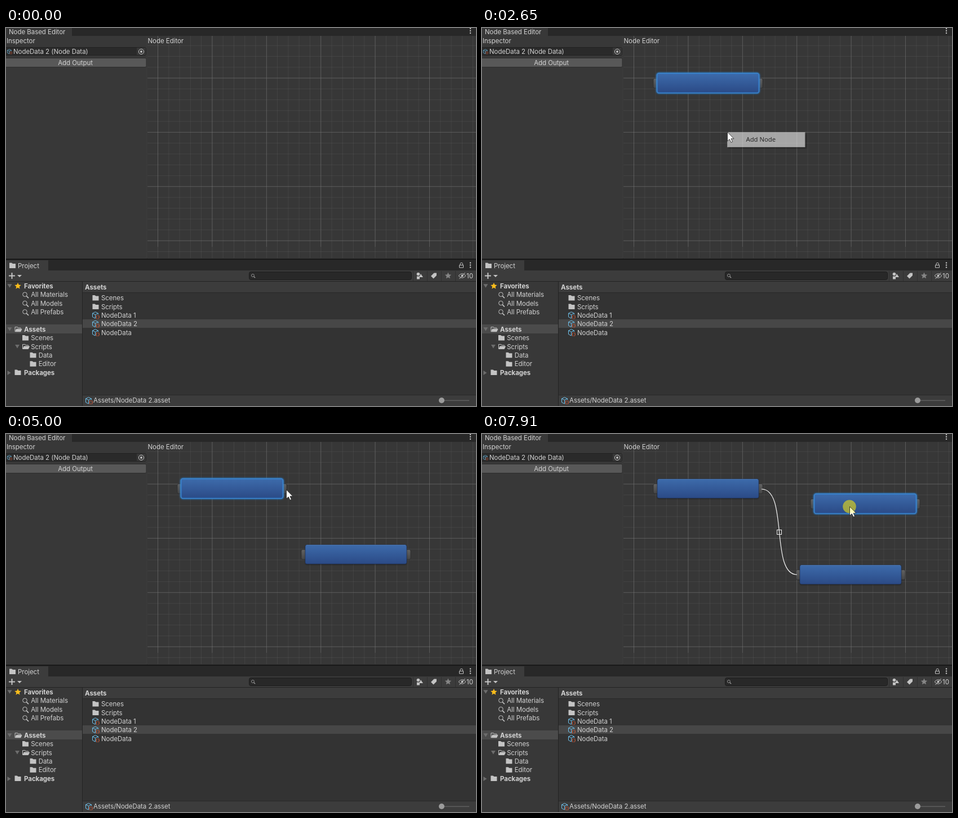
Animation, 834 px wide and 672 px high, one loop 7.99 s. Source, as an HTML page:

```html
<!DOCTYPE html>
<html lang="en">
<head>
<meta charset="utf-8">
<title>Node editor</title>
<style>
  html, body { margin: 0; width: 100%; height: 100%; overflow: hidden; background: #383838; }
  svg { display: block; }
  text { font: 11.5px Inter, Roboto, sans-serif; letter-spacing: -.05px; fill: #d2d2d2; white-space: pre; }
  .bold { font-weight: 700; }
  .menu { font: 11.3px "Open Sans", "Noto Sans", sans-serif; letter-spacing: 0; fill: #111; }
  .line { fill: none; stroke: #c4c4c4; }
</style>
</head>
<body>
<svg width="834" height="672" viewBox="0 0 834 672">
  <defs>
    <linearGradient id="body" x2="0" y2="1">
      <stop offset="0" stop-color="#3d6bab"/><stop offset="1" stop-color="#2b4a86"/>
    </linearGradient>
    <linearGradient id="pin" x2="0" y2="1">
      <stop offset="0" stop-color="#626262"/><stop offset="1" stop-color="#454545"/>
    </linearGradient>
    <linearGradient id="lit" x2="0" y2="1">
      <stop offset=".5" stop-color="#ffffb8"/><stop offset=".75" stop-color="#fff"/>
    </linearGradient>
    <filter id="blur" x="-10%" y="-40%" width="120%" height="180%"><feGaussianBlur stdDeviation="1.2"/></filter>
    <path id="folder" d="M0 0H4L6 1.5H11V9.5H0z" fill="#c4c4c4"/>
    <g id="open" class="line"><path d="M.5 9V1H5L6 2.5H10.500V4"/><path d="M1 9 3 4.500H12.500L10.500 9z" fill="#c4c4c4"/></g>
    <g id="lens" class="line"><circle cx="4.5" cy="4.5" r="3.8"/><path d="M7.300 7.300 11 11" stroke-width="1.6"/></g>
    <g id="asset" fill="none">
      <path d="M10.500 5V3L5.500 .5 .5 3V9.500L5.500 12V5.300L.5 3M5.500 5.300 10.500 3" stroke="#6fc0ea"/>
      <path d="M9 6.500Q7.500 6.500 7.700 8T6.700 9.600Q7.900 9.800 7.700 11.200T9 12.700M10.500 6.500Q12 6.500 11.800 8T12.800 9.600Q11.600 9.800 11.800 11.200T10.500 12.700" stroke="#e0603c"/>
    </g>
    <g id="dots" fill="#c4c4c4"><circle r="1.2" cy="-4"/><circle r="1.2"/><circle r="1.2" cy="4"/></g>
  </defs>
  <g id="ui"></g>
  <g id="stage"></g>
</svg>
<script>
const GREY = '#c4c4c4';
const rect = (x, y, w, h, fill, more = '') =>
  `<rect x="${x}" y="${y}" width="${w}" height="${h}" fill="${fill}" ${more}/>`;
// Text is placed by its vertical centre, on a whole-pixel baseline.
const text = (x, y, s, cls = '', more = '') =>
  `<text x="${x}" y="${Math.round(y + 4.2)}" class="${cls}" ${more}>${s}</text>`;
const use = (id, x, y, scale = 1) => `<use href="#${id}" transform="translate(${x} ${y}) scale(${scale})"/>`;
const shape = (d, fill, more = '') => `<path d="${d}" fill="${fill}" ${more}/>`;
const line = (d, more = '') => `<path class="line" d="${d}" ${more}/>`;
const dot = (x, y, r, fill, more = '') => `<circle cx="${x}" cy="${y}" r="${r}" fill="${fill}" ${more}/>`;

function star(x, y, fill) {
  const tip = i => {
    const a = i * Math.PI / 5, r = i % 2 ? 2.8 : 6;
    return `${x + r * Math.sin(a)} ${y - r * Math.cos(a)}`;
  };
  return shape('M' + Array.from({ length: 10 }, (_, i) => tip(i)).join('L') + 'z', fill);
}

function grid() {
  const big = 96.4, small = big / 5;
  let minor = '', major = '';
  for (let x = 269.5 - small; x < 834; x += small) minor += `M${x} 14V409`;
  for (let y = 89 - 3 * small; y < 410; y += small) minor += `M251 ${y}H834`;
  for (let x = 269.5; x < 834; x += big) major += `M${x} 14V389`;
  for (let y = 89; y < 400; y += big) major += `M251 ${y}H834`;
  return shape(minor, 'none', 'stroke="#808080" stroke-opacity=".18"') +
    shape(major, 'none', 'stroke="#808080" stroke-opacity=".4"');
}

function editorPanel() {
  return rect(0, 0, 834, 14, '#282828') + rect(0, 0, 117, 14, '#383838') +
    text(5, 6.5, 'Node Based Editor') + use('dots', 824, 5) +
    rect(250, 14, 584, 397, '#373737') + rect(250, 14, 1, 397, '#2e2e2e') + grid() +
    text(1, 22.5, 'Inspector') + text(251.5, 22.5, 'Node Editor') +
    rect(-2, 34.5, 250.5, 14, '#2a2a2a', 'stroke="#222" rx="2"') + rect(232, 35, 16, 13, '#373737') +
    use('asset', 2, 37.5, .7) + text(13, 42, 'NodeData 2 (Node Data)') +
    dot(240, 42, 4.6, 'none', `stroke="${GREY}"`) + dot(240, 42, 1.9, GREY) +
    rect(-2, 53.5, 251, 16, '#585858', 'stroke="#2d2d2d" rx="2"') +
    text(123, 61.5, 'Add Output', '', 'text-anchor="middle"');
}

function toolbar() {
  return rect(0, 431, 834, 20, '#3c3c3c') + rect(0, 450, 834, 1, '#232323') +
    line('M5 440.500H16M10.500 435V446', 'stroke-width="2"') + shape('M20 439H28L24 443z', GREY) +
    rect(431.5, 433.5, 288, 14, '#282828', 'rx="3" stroke="#1b1b1b"') + use('lens', 435, 437, .65) +
    [0, 1, 2, 3].map(i => rect(722 + 25 * i, 432, 1, 18, '#303030')).join('') +
    dot(731.5, 437.5, 2.8, GREY) + shape('M736 437 740 443H733z', GREY) + rect(729, 441.5, 5, 5, GREY) +
    shape('M754 441 759.500 435.500H764V440L758.500 445.500z', GREY) + star(784.5, 440.5, '#858585') +
    line('M803 440.500Q809.500 433 816 440.500 809.500 448 803 440.500M804.500 446 814.500 435') +
    dot(809.5, 440.5, 2, GREY) + text(817, 440.5, '10');
}

const ROW = 15.38;
const treeRows = [ // depth, icon, label, fold arrow
  [0, 'star', 'Favorites', 'down'], [1, 'lens', 'All Materials'], [1, 'lens', 'All Models'], [1, 'lens', 'All Prefabs'],
  null,
  [0, 'open', 'Assets', 'down'], [1, 'folder', 'Scenes'], [1, 'open', 'Scripts', 'down'],
  [2, 'folder', 'Data'], [2, 'folder', 'Editor'], [0, 'folder', 'Packages', 'right']
];
const fold = { down: 'h8l-4 6.500z', right: 'v8l6-4z' };

function tree() {
  return rect(0, 527, 135, 16, '#4b4b4b') + treeRows.map((row, i) => {
    if (!row) return '';
    const [depth, icon, label, arrow] = row, x = 15.5 + 13.5 * depth, y = 458.8 + ROW * i;
    return (arrow ? shape(`M${x - 13} ${y - 3.500}${fold[arrow]}`, '#6c6c6c') : '') +
      (icon === 'star' ? star(x + 5.5, y, '#f9bd1c') : use(icon, x, y - 5)) +
      text(x + (depth ? 15.2 : 16.5), y, label, depth ? '' : 'bold');
  }).join('');
}

function projectPanel() {
  const files = ['Scenes', 'Scripts', 'NodeData 1', 'NodeData 2', 'NodeData'].map((s, i) => {
    const y = 480 + ROW * i;
    return (i < 2 ? use('folder', 153.5, y - 5) : use('asset', 153, y - 6.5)) + text(169, y, s);
  }).join('');
  return rect(0, 410, 834, 2, '#191919') + rect(0, 412, 834, 19, '#282828') + rect(0, 413, 75, 18, '#3c3c3c') +
    use('folder', 6, 417.5) + text(21, 422.5, 'Project') +
    line('M804.500 421.500h7v4.500h-7zM806 421V419.500a2.200 2.200 0 0 1 4.400 0V421') + use('dots', 824, 421.5) +
    toolbar() +
    rect(0, 451, 135, 221, '#383838') + rect(136, 451, 698, 202, '#333') +
    rect(136, 451, 698, 19, '#3c3c3c') + rect(136, 470, 698, 1, '#282828') + text(140, 461, 'Assets', 'bold') +
    rect(136, 518, 698, 15, '#474747') + files +
    rect(136, 653, 698, 19, '#3c3c3c') + rect(136, 652, 698, 1, '#282828') +
    use('asset', 141, 656) + text(155, 662, 'Assets/NodeData 2.asset') +
    rect(768, 661.5, 54, 1.5, '#5e5e5e') + dot(773, 662, 5, '#9b9b9b') +
    rect(135, 451, 1, 221, '#232323') + tree();
}

document.getElementById('ui').innerHTML = editorPanel() + projectPanel();

// The session is told as pointer actions, timed in recorder steps.
const LOOP = 7990, START = 530, STEP = 78.5;
const glides = [], presses = [], menus = [], nodes = [];
let hand = [556, 470];

const press = (from, to) => presses.push({ from, to });

function glide(from, to, x, y) {
  glides.push({ from, to, a: hand, b: [x, y] });
  hand = [x, y];
}

// Opens the context menu under the pointer, then picks its item.
function addNode(from, to) {
  const [x, y] = hand;
  press(from, from + (nodes.length ? 1 : 2));
  menus.push({ from, to, x, y });
  nodes.push({ born: to, x: x + 8, y: y + 6, drags: [] });
  glide(from + 2, to - 1, x + 65, y + 10);
}

function drag(node, from, to, dx, dy) {
  press(from, to + 2);
  nodes[node].drags.push({ from, to, dx, dy });
  glide(from, to, hand[0] + dx, hand[1] + dy);
}

glide(0, 2, 312, 159);
addNode(4, 12);
glide(11, 14, 392, 185);
press(15, 16);
drag(0, 16, 21, -9, -84);
glide(22, 25, 435, 185);
addNode(26, 31);
glide(30, 33, 515, 205);
drag(1, 34, 36, 60, 20);
drag(1, 36, 41, 28, -14);
glide(43, 47, 489, 100);
drag(0, 47, 48, 0, -1);
glide(49, 52, 514, 123);
glide(52, 57, 497, 99);
press(58, 60);
glide(59, 62, 489, 140);
glide(62, 68, 527, 208);
press(69, 72);
glide(71, 72, 534, 211);
glide(72, 75, 590, 214);
drag(1, 75, 78, 33, 36);
glide(78, 83, 590, 87);
glide(83, 85, 579, 108);
addNode(85, 89);
glide(88, 91, 649, 136);
drag(2, 91, 94, 3, -7);
const LINK_START = 60, LINK_DONE = 70;

const during = k => span => k >= span.from && k < span.to;

function ease(k, { from, to }) {
  const u = Math.min(1, Math.max(0, (k - from) / (to - from)));
  return u * u * (3 - 2 * u);
}

function pointer(k) {
  const g = glides.filter(s => s.from <= k).pop(), u = ease(k, g);
  return g.a.map((v, i) => v + (g.b[i] - v) * u);
}

const place = (node, k) => [
  Math.round(node.drags.reduce((x, d) => x + d.dx * ease(k, d), node.x)),
  Math.round(node.drags.reduce((y, d) => y + d.dy * ease(k, d), node.y))
];

const lastGrab = (node, k) => Math.max(-1, ...node.drags.map(d => d.from).filter(s => s <= k));

function drawNode([x, y], selected) {
  const frame = (d, more) => rect(x - d, y - d, 180 + 2 * d, 34 + 2 * d, 'none', more);
  const pin = px => rect(px, y + 8.5, 14, 17.5, 'url(#pin)', 'rx="2.5" stroke="#2a2a2a" stroke-width=".7"');
  const shadow = rect(x, y + 1.5, 180, 34, '#000', 'rx="3" opacity=".35" filter="url(#blur)"');
  const edge = selected
    ? frame(1, 'rx="4" stroke="#2b7fd0" stroke-width="2.6" opacity=".8" filter="url(#blur)"') +
      frame(.6, 'rx="3.5" stroke="#3f8ad4" stroke-width="1.3"')
    : frame(0, 'rx="3" stroke="#22365c" stroke-width=".7"') + rect(x + 2, y, 176, 1, '#5580ba', 'opacity=".7"');
  return pin(x - 7) + pin(x + 173) + shadow + rect(x, y, 180, 34, 'url(#body)', 'rx="3"') + edge;
}

function drawLink(k) {
  const [ax, ay] = place(nodes[0], k), [nx, ny] = place(nodes[1], k);
  const done = k >= LINK_DONE, bend = 48;
  const x1 = ax + 185, y1 = ay + 18;
  const [x2, y2] = done ? [nx - 5, ny + 17] : pointer(k);
  const handle = rect(Math.floor((x1 + x2) / 2) - 3.5, Math.floor((y1 + y2) / 2) - 3.5, 8, 8, 'none', 'stroke="#eee"');
  return shape(`M${x1} ${y1}C${x1 + bend} ${y1} ${x2 - bend} ${y2} ${x2} ${y2}`, 'none', 'stroke="#f4f4f4" stroke-width="1.2"') +
    (done ? handle : '');
}

function drawMenu({ from, x, y }, k, [px, py]) {
  const hover = px > x + 3 && px < x + 135 && py > y + 3 && py < y + 24;
  return `<g opacity="${Math.min(1, .3 * (k - from + 1))}">` +
    rect(x + 3, y + 3, 138, 26, '#000', 'opacity=".5" filter="url(#blur)"') +
    rect(x + .5, y + .5, 137.5, 26, '#f0f0f0', 'stroke="#d0d0d0"') +
    (hover ? rect(x + 3, y + 3, 132, 21, '#91c9f7') : '') +
    text(x + 33.5, y + 13, 'Add Node', 'menu') + '</g>';
}

function drawPointer([x, y], down) {
  return (down ? dot(x, y, 11.8, '#e0d61c', 'opacity=".65"') : '') +
    shape('M.5 0V16L4.300 12.800 7 18.500 9.500 17.300 7 11.800H12z', down ? 'url(#lit)' : '#fff',
      `transform="translate(${x} ${y})" stroke="#1c1c1c" stroke-width=".8"`);
}

function scene(k) {
  if (k < 0) return '';
  const at = pointer(k), latest = Math.max(0, ...nodes.map(n => lastGrab(n, k)));
  return nodes.filter(n => k >= n.born).map(n => drawNode(place(n, k), lastGrab(n, k) === latest)).join('') +
    (k >= LINK_START ? drawLink(k) : '') +
    menus.filter(during(k)).map(m => drawMenu(m, k, at)).join('') +
    drawPointer(at, presses.some(during(k)));
}

const stage = document.getElementById('stage');
let shown = null;
function tick() {
  const k = Math.floor((performance.now() % LOOP - START) / STEP + .2);
  if (k !== shown) stage.innerHTML = scene(shown = k);
  requestAnimationFrame(tick);
}
tick();
</script>
</body>
</html>
```
